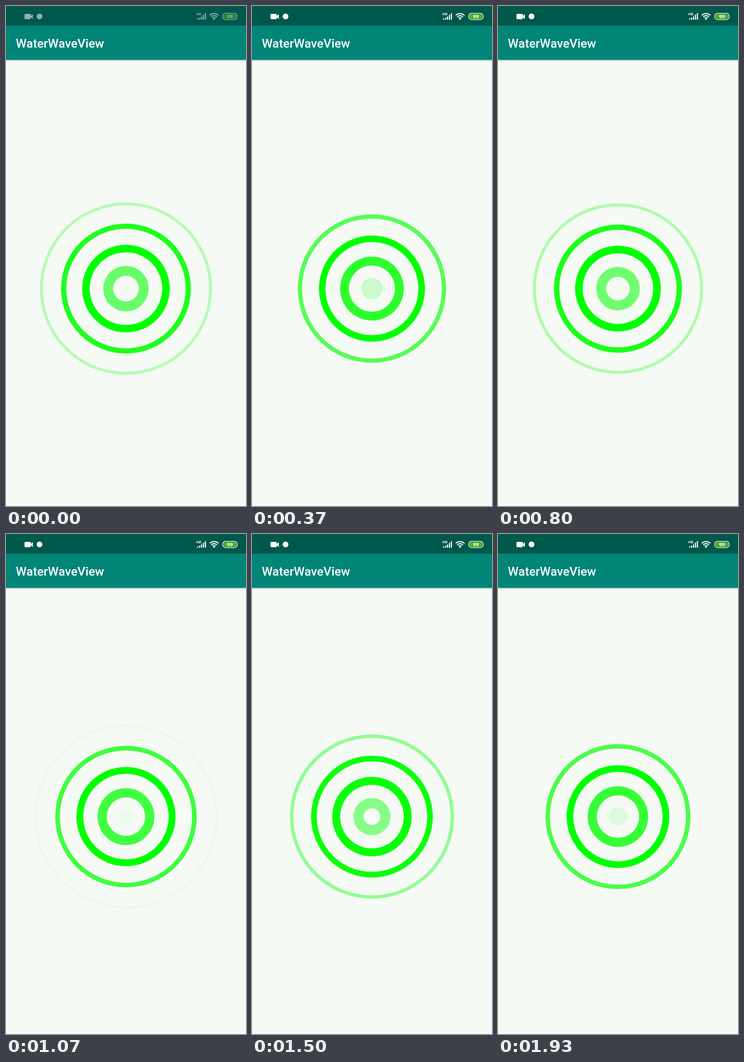
Recreate the animation shown at these times as an HTML page with a canvas. Size 519 by 1080 pixels, loop 1960 ms.

```html
<!DOCTYPE html>
<html lang="en">
<head>
<meta charset="utf-8">
<title>WaterWaveView</title>
<style>
  html, body { margin: 0; width: 100%; height: 100%; overflow: hidden; background: #f5faf5; }
  canvas, svg { position: absolute; left: 0; top: 0; width: 519px; height: 1080px; }
  text { font-family: Roboto, sans-serif; fill: #fff; }
</style>
</head>
<body>
<canvas id="waves" width="519" height="1080"></canvas>
<svg viewBox="0 0 519 1080">
  <defs>
    <linearGradient id="shadow" x2="0" y2="1">
      <stop offset="0" stop-color="#000" stop-opacity=".24"/>
      <stop offset="1" stop-color="#000" stop-opacity="0"/>
    </linearGradient>
  </defs>
  <rect y="116" width="519" height="4" fill="url(#shadow)"/>
  <rect y="42" width="519" height="74.3" fill="#008577"/>
  <rect width="519" height="42.4" fill="#00574b"/>
  <text x="21.3" y="90" font-size="26.4" font-weight="500">WaterWaveView</text>

  <g id="status" fill="#fff">
    <rect x="40" y="17" width="13.5" height="11.5" rx="1.4"/>
    <path d="M52 22.7 58 17.4V28.2Z"/>
    <circle cx="72.5" cy="22.5" r="6.2"/>
    <text x="411.8" y="20" font-size="8" font-weight="700">HD</text>
    <path stroke="#fff" stroke-width="2.4"
      d="M414.3 29.5v-2.5M418.6 29.5v-4.5M422.8 29.5v-7M427 29.5v-10.5M431.2 29.5v-14"/>
    <g fill="none" stroke="#fff" stroke-width="2.2">
      <path d="M440.6 20.3a13.3 13.3 0 0 1 18.8 0M443.6 23.5a9 9 0 0 1 12.8 0M446.6 26.4a4.9 4.9 0 0 1 6.8 0"/>
    </g>
    <circle cx="450" cy="28.4" r="1.6"/>
    <rect x="468.7" y="15.8" width="31.2" height="13.6" rx="6.2" fill="none" stroke="#fff" stroke-width="1.5"/>
    <rect x="470.6" y="17.7" width="27.4" height="9.8" rx="4.6" fill="#4cbb17"/>
    <text x="484.2" y="26.6" font-size="11" font-weight="700" text-anchor="middle">99</text>
  </g>
</svg>
<script>
const LOOP = 1960, GAP = 45.7, MAX_RADIUS = 200;
const CX = 259.4, CY = 610.4;
// [tick, travelled distance]; 30 ticks per second
const TRAVEL = [[0, 3.3], [11, 23.2], [24, 47], [32, 61.5], [45, 85.9], [50, 94.7], [58, 111]];

const ctx = document.getElementById('waves').getContext('2d');
const statusIcons = document.getElementById('status');

function travelAt(tick) {
  const i = Math.max(1, TRAVEL.findIndex(([t]) => t >= tick));
  const [t0, d0] = TRAVEL[i - 1], [t1, d1] = TRAVEL[i];
  return d0 + (d1 - d0) * (tick - t0) / (t1 - t0);
}

function drawRing(outer) {
  // radius of the stroke's centre line; the stroke thins as it grows
  const radius = (outer - 12.6) / 0.948;
  if (radius < 0 || radius > MAX_RADIUS) return;
  const inner = Math.max(0, outer - (25.2 - 0.1034 * radius));
  const alpha = 1.05 * Math.sin(Math.PI * radius / MAX_RADIUS) - 0.02;
  ctx.globalAlpha = Math.min(1, Math.max(0, alpha));
  ctx.beginPath();
  ctx.arc(CX, CY, outer, 0, 2 * Math.PI);
  ctx.closePath();
  if (inner > 0) {
    ctx.moveTo(CX + inner, CY);
    ctx.arc(CX, CY, inner, 0, 2 * Math.PI);
  }
  ctx.fill('evenodd');
}

function render(time) {
  const tick = Math.min(58, Math.floor((Math.floor(time / 10) + 0.5) * 0.3));
  const phase = travelAt(tick) % GAP;
  ctx.clearRect(0, 0, 519, 1080);
  ctx.fillStyle = '#0f0';
  for (let i = 0; i < 5; i++) drawRing(phase + i * GAP);
  statusIcons.setAttribute('opacity', Math.min(1, 0.55 + 0.15 * tick));
}

const start = performance.now();
function loop() {
  render((performance.now() - start) % LOOP);
  requestAnimationFrame(loop);
}
loop();
</script>
</body>
</html>
```
